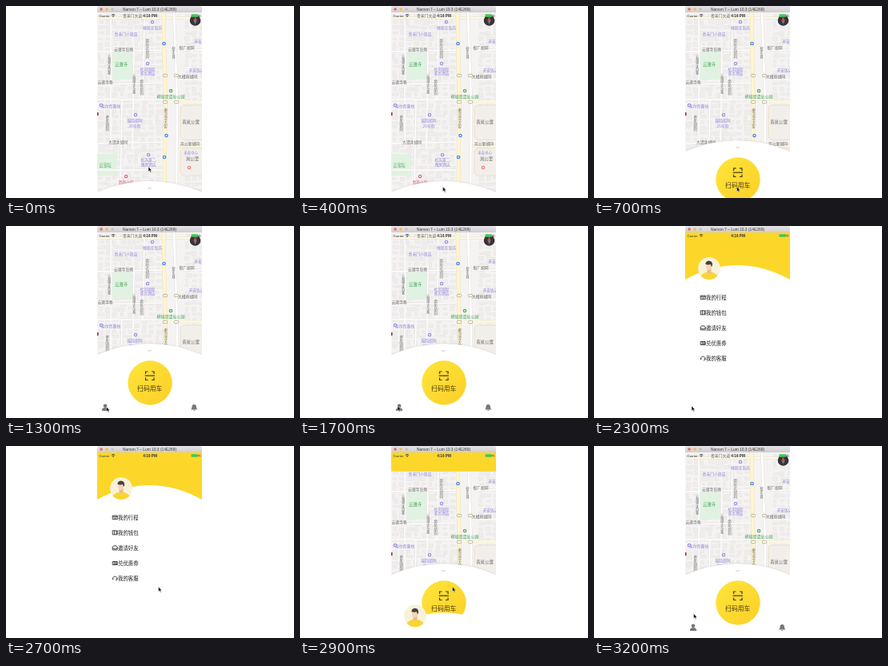
Animation, 360 px wide and 240 px high, one loop 3300 ms. Source, as an HTML page:

```html
<!DOCTYPE html>
<html lang="zh">
<head>
<meta charset="utf-8">
<style>
html, body { margin: 0; width: 100%; height: 100%; overflow: hidden; background: #fff; }
svg { display: block; width: 360px; height: 240px; }
text { font-family: "Noto Sans CJK SC", "Noto Sans CJK", sans-serif; text-anchor: middle; dominant-baseline: central; }
.latin { font-family: "Liberation Sans", Arial, sans-serif; }
</style>
</head>
<body>
<svg viewBox="0 0 360 240" xmlns="http://www.w3.org/2000/svg">
  <defs>
    <clipPath id="screen"><rect x="114" y="8" width="131" height="232"/></clipPath>
    <clipPath id="face"><circle r="14"/></clipPath>
    <linearGradient id="gold" x1="0" y1="0" x2="1" y2="1">
      <stop offset="0" stop-color="#ffe53a"/><stop offset="1" stop-color="#fbcf27"/>
    </linearGradient>
    <linearGradient id="chrome" x1="0" y1="0" x2="0" y2="1">
      <stop offset="0" stop-color="#e6e4e6"/><stop offset="1" stop-color="#cfcdcf"/>
    </linearGradient>
    <filter id="soft" x="-10%" y="-10%" width="120%" height="120%"><feGaussianBlur stdDeviation="1.2"/></filter>
  </defs>

  <g clip-path="url(#screen)">
    <rect x="114" y="8" width="131" height="232" fill="#f5f3f2"/>
    <g id="map"></g>
    <circle cx="236.500" cy="18" r="6.800" fill="#34343a"/>
    <path d="M236.500 13l2.200 5h-4.400z" fill="#d8403c"/>
    <path d="M236.500 23l2.200-5h-4.400z" fill="#77777c"/>

    <g id="home">
      <path d="M114 161Q179.500 133 245 161V330H114Z" fill="#777" opacity=".3" filter="url(#soft)"/>
      <path d="M114 161Q179.500 133 245 161V330H114Z" fill="#fff"/>
      <path id="chevron" fill="none" stroke="#b5b5b5" stroke-width=".8"/>
      <circle cx="180" cy="196" r="27.700" fill="url(#gold)"/>
      <path d="M174.500 185v-3h3M182 182h3v3M185 189.500v3h-3M177.500 192.500h-3v-3M173.700 187.200h12.200" fill="none" stroke="#4b3d16" stroke-width="1.200"/>
      <text x="179.700" y="202.500" font-size="7.800" fill="#4b3d16">扫码用车</text>
      <g fill="#777">
        <circle cx="124" cy="224.700" r="2.300"/>
        <path d="M119.800 231q0-4 4.200-4t4.200 4z"/>
        <path d="M231 229.600q1.500-1.200 1.500-3.600 0-3 2.700-3t2.700 3q0 2.400 1.500 3.600z"/>
        <path d="M234 230h2.600q-1.300 1.800-2.600 0z"/>
      </g>
    </g>

    <rect id="header" x="114" y="8" width="131" fill="#fcd72a"/>
    <g id="sheet">
      <path d="M114 67Q179.500 31 245 67V520H114Z" fill="#fff"/>
      <g transform="translate(144 53)" clip-path="url(#face)">
        <circle r="14" fill="#f8f2d8"/>
        <ellipse cy="13" rx="11.500" ry="8.500" fill="#f9d532"/>
        <path d="M-2.500 0h5v5q-2.500 2-5 0z" fill="#eab993"/>
        <ellipse cx="-.5" cy="-2.500" rx="3.600" ry="4.600" fill="#f8d5b6"/>
        <path d="M-4.500-5q-.5-4 4-4.500 5-.2 4.500 6l-1.200 1.500-.8-3q-3 .8-6.500 0z" fill="#45423f"/>
      </g>
    </g>
    <g id="menu"></g>

    <g fill="#333">
      <text class="latin" x="123" y="12" font-size="4.300">Carrier</text>
      <path d="M131.800 11.300q2.200-1.900 4.400 0M132.800 12.400q1.200-1 2.400 0" fill="none" stroke="#333" stroke-width=".8"/>
      <circle cx="134" cy="13.300" r=".6"/>
      <text class="latin" x="180" y="12" font-size="4.700" font-weight="bold">4:16 PM</text>
      <rect x="231.500" y="10.300" width="8.500" height="3.500" rx=".7" fill="#42c75a"/>
      <rect x="240.500" y="11.300" width=".7" height="1.500"/>
      <path d="M242.500 10.500l-1 1.700h1.600l-1 1.700" fill="none" stroke="#333" stroke-width=".4"/>
    </g>
  </g>

  <path d="M114 8V2q0-2 2-2H243q2 0 2 2V8Z" fill="url(#chrome)"/>
  <circle cx="119" cy="4" r="1.800" fill="#ef6a5e"/>
  <circle cx="126" cy="4" r="1.800" fill="#f3bd45"/>
  <circle cx="133" cy="4" r="1.800" fill="#c3c1c3"/>
  <text class="latin" x="179.500" y="4.200" font-size="4.900" fill="#3c3c3c">Narvon 7 – Lum 10.3 (14E269)</text>

  <path id="cursor" d="M0 0v6l1.400-1.200 1 2.200 1-.4-1-2.200h1.900z" fill="#111" stroke="#fff" stroke-width=".4"/>
</svg>

<script>
const $ = id => document.getElementById(id);
const GRAY = '#666', VIOLET = '#9187dc', GREEN = '#43a458';

function add(parent, tag, attrs, content = '') {
  const el = document.createElementNS('http://www.w3.org/2000/svg', tag);
  for (const key in attrs) el.setAttribute(key, attrs[key]);
  el.textContent = content;
  parent.append(el);
  return el;
}

const map = $('map');
const box = (x, y, width, height, fill, stroke = 'none') =>
  add(map, 'rect', { x, y, width, height, fill, stroke, 'stroke-width': .4 });
const line = (d, stroke, width) => add(map, 'path', { d, stroke, 'stroke-width': width, fill: 'none' });
const label = (x, y, text, fill = GRAY, size = 4.8) => add(map, 'text', { x, y, fill, 'font-size': size }, text);
const column = (x, y, text) => [...text].forEach((c, i) => label(x, y + i * 5.1, c, GRAY, 4.2));
function road(d, edge, fill, width) {
  line(d, edge, width);
  line(d, fill, width - .9);
}
function pin(x, y, color) {
  add(map, 'circle', { cx: x, cy: y, r: 2.3, fill: color });
  add(map, 'circle', { cx: x, cy: y, r: .9, fill: '#fff' });
}

function drawMap() {
  let seed = 11;
  const random = () => (seed = seed * 16807 % 2147483647) / 2147483647;
  for (let y = 10; y < 238; y += 7) {
    for (let x = 115; x < 245; x += 9) {
      if (x > 188 && x < 216) continue;
      box(x + random() * 2, y + random() * 2, 3 + random() * 5, 2 + random() * 4, '#efedec', '#e3e0df');
    }
  }
  box(133, 56, 25, 36, '#e1f2e2');
  box(114, 185, 25, 27, '#e1f2e2');

  road('M114 57L196 55M114 98L196 96M114 117H196M114 172L196 170M131 15V172M160 57L158 180M173 15L171 117M145 117L143 230M214 92H245M214 55H245M114 205H196', '#e6e3e2', '#fff', 2.4);
  road('M114 15H245M214 175H245', '#e9dfc4', '#fdf8e6', 3);
  for (const [y, height] of [[124, 43], [178, 34]]) {
    add(map, 'rect', { x: 218, y, width: 34, height, rx: 5, fill: '#f2efeb', stroke: '#eae0c6', 'stroke-width': 1 });
  }
  road('M199 119.500H245', '#eee4c4', '#fdf8e2', 3.2);
  road('M197 8L199 120L198 240', '#eee0ad', '#fdf5d2', 5);
  road('M210 8L214 120L213 240', '#e2dedb', '#fff', 3.6);
  for (const [x, y] of [[199, 87], [213, 87], [199, 120], [213, 120]]) {
    add(map, 'rect', { x: x - 2.6, y: y - 1.6, width: 5.2, height: 3.2, rx: 1, fill: '#fff', stroke: '#a8996f', 'stroke-width': .7 });
  }
  for (const [x, y] of [[197.5, 47], [200.5, 162], [198, 189]]) pin(x, y, '#4b86e8');
  for (const [x, y] of [[183, 20], [177, 72], [119, 124], [162, 136], [178, 186]]) pin(x, y, '#9f93e4');
  pin(206, 106, '#4cb45a');
  pin(150, 213, '#e8648a');
  pin(229, 202, '#ea7f86');
  box(113, 133, 2.5, 4, '#8e2c3c');

  label(158, 11, '青禾门大道');
  label(183, 26, '槐影庄饭店', VIOLET);
  label(150, 34, '青禾门小旅店', VIOLET);
  label(147, 53, '云澈寺后巷');
  label(144, 73, '云澈寺', GREEN, 5.4);
  label(177, 78, '松岚国际', VIOLET);
  label(177, 83.5, '商务酒店', VIOLET);
  label(124, 94, '云澈寺巷');
  label(226, 51, '梨厂胡同');
  label(240, 43, '禾安', VIOLET);
  label(238, 79, '禾安饭店', VIOLET);
  label(227, 87, '大槿府胡同');
  label(206, 112.5, '柳城堤遗址公园', GREEN, 5);
  label(131, 124, '朵尔青客栈', VIOLET);
  label(161, 142.5, '瑶隐胡同', VIOLET);
  label(161, 149, '26号院', VIOLET);
  label(231, 145, '青岚公寓', GRAY, 5.4);
  label(140, 169, '大澄井胡同');
  label(230, 171, '岚公里胡同');
  label(231, 183, '禾安中心', VIOLET, 4.4);
  label(233, 191, '岚公里', GRAY, 5.4);
  label(178, 191.5, '松岚嘉二', VIOLET);
  label(178, 197.5, '雅居酒店', VIOLET);
  label(124, 198, '云宝坛', GREEN, 5.2);
  label(150, 219, '青苑小馆', '#d65379');

  column(176.5, 42.5, '绸坊北胡同');
  column(129, 62.5, '云澈寺西巷');
  column(160, 86.5, '云澈寺东巷');
  column(169.5, 93.5, '绸坊胡同');
  column(209.5, 52.5, '梨东巷');
  column(126.5, 139, '瓷库胡同');
  column(199.5, 130, '柳河湾大街');
}

const ICONS = [
  'M-3-2.200H3V2.500H-3ZM-3-.8H3M-1.500 1H1.500',
  'M-3-2.500H3V2.500H-3ZM-.8-2.500V2.500M.8-1H3M.8 1H3',
  'M-3 2.500V-1L-1.800-2.500H1.800L3-1V2.500ZM-3 0L0 1.500 3 0',
  'M-3-2H3V2H-3ZM-1-2V2M0-.5H3M0 .7H3',
  'M-2.500 1.500A2.800 2.800 0 1 1 2.500 1.500L.8 2.700M-2.500-.5V1.500M2.500-.5V1.500'
];
const rows = ['我的行程', '我的钱包', '邀请好友', '兑优惠券', '我的客服'].map((text, i) => {
  const row = add($('menu'), 'g', {});
  add(row, 'path', { d: ICONS[i], transform: 'translate(136.200 0)', fill: 'none', stroke: '#333', 'stroke-width': .9 });
  add(row, 'text', { x: 152.8, y: 0, 'font-size': 6.4, 'font-weight': 500, fill: '#1c1c1c' }, text);
  return row;
});

const ease = (t, start, length) => {
  const k = Math.min(1, Math.max(0, (t - start) / length));
  return k * k * (3 - 2 * k);
};
const moveTo = (el, x, y) => el.setAttribute('transform', `translate(${x} ${y})`);

// time, x, y of the pointer tip
const POINTER = [
  [0, 178, 201], [400, 178.5, 226], [900, 178.5, 226], [1200, 125.5, 226], [1400, 125.5, 226],
  [1700, 122, 225], [2400, 122, 225], [2650, 190.5, 176], [2900, 190.5, 176], [3200, 124.5, 209.5]
];
function pointerAt(t) {
  const i = Math.max(1, POINTER.findIndex(p => p[0] >= t));
  const [t0, x0, y0] = POINTER[i - 1], [t1, x1, y1] = POINTER[i];
  const k = ease(t, t0, t1 - t0);
  return [x0 + (x1 - x0) * k, y0 + (y1 - y0) * k];
}

const LOOP = 3300, STEP = 100;
function render(t) {
  const raised = ease(t, 443, 400);
  const open = ease(t, 1746, 450) - ease(t, 2725, 280);
  moveTo($('home'), 0, 71.7 * (1 - raised));
  const bend = raised * 2 - 1;
  $('chevron').setAttribute('d', `M177.300 ${156 - bend * .6}L179.500 ${156 + bend * .6}L181.700 ${156 - bend * .6}`);
  $('header').setAttribute('height', 75 * open);
  moveTo($('sheet'), 0, 233 * (1 - open));
  rows.forEach((row, i) => moveTo(row, 0, 89.2 + 19.1 * i + (231 + 23.5 * i) * (1 - open)));
  moveTo($('cursor'), ...pointerAt(t));
}

drawMap();
const began = performance.now();
function tick() {
  const t = (performance.now() - began) % LOOP;
  render(Math.floor(t / STEP) * STEP);
  requestAnimationFrame(tick);
}
tick();
</script>
</body>
</html>
```
